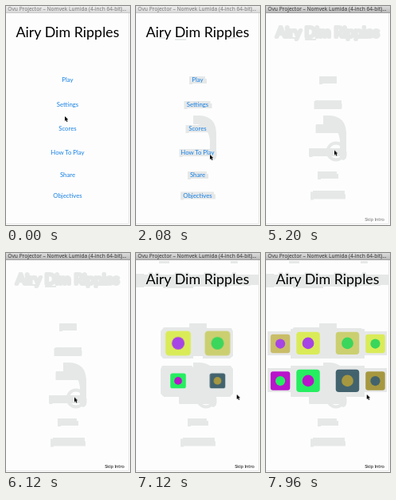
An HTML page that plays this animation: 156x274 px, repeating every 8 s.

```html
<!DOCTYPE html>
<html lang="en">
<head>
<meta charset="utf-8">
<title>Menu and intro</title>
<style>
  html, body { margin: 0; width: 100%; height: 100%; overflow: hidden; background: #fdfdfd; }
  svg { display: block; width: 156px; height: 274px; }
  text { font-family: Lato, sans-serif; text-anchor: middle; }
  .bar { font: 6.6px "Noto Sans", sans-serif; }
  .title { font-size: 17.9px; }
  .label { font-size: 7.8px; fill: #1680e4; }
  .skip { font-size: 5.9px; fill: #111; }
  .smear { fill: #e6e8e8; stroke: #e6e8e8; stroke-width: 0; stroke-linejoin: round; }
  .tile, .ring { transform-box: fill-box; transform-origin: center; }
</style>
</head>
<body>
<svg id="stage" viewBox="0 0 156 274">
  <defs>
    <linearGradient id="idle" x2="0" y2="1"><stop stop-color="#ececec"/><stop offset="1" stop-color="#d9d9d9"/></linearGradient>
    <linearGradient id="active" x2="0" y2="1"><stop stop-color="#dcdcdc"/><stop offset="1" stop-color="#b9b9b9"/></linearGradient>
  </defs>
</svg>
<script>
const LOOP = 8000;
const stage = document.getElementById('stage');

function add(tag, attrs = {}, parent = stage, text = '') {
  const el = document.createElementNS('http://www.w3.org/2000/svg', tag);
  for (const key in attrs) el.setAttribute(key, attrs[key]);
  el.textContent = text;
  return parent.appendChild(el);
}

// steps: [time in ms, value, easing towards the next step]
function track(el, prop, steps) {
  const first = [0, steps[0][1]], last = [LOOP, steps[steps.length - 1][1]];
  const frames = [first, ...steps, last].map(([time, value, easing = 'linear']) =>
    ({ offset: time / LOOP, [prop]: value, easing }));
  el.animate(frames, { duration: LOOP, iterations: Infinity });
  return el;
}

const fade = (el, ...steps) => track(el, 'opacity', steps);
const showAt = (el, time) => fade(el, [time, 0], [time, 1]);
const hideAt = (el, time) => fade(el, [time, 1], [time, 0]);

const TITLE = 'Airy Dim Ripples';
const WINDOW = 'Ovu Projector – Nomvek Lumida (4-inch 64-bit)...';
const LABELS = [
  ['Play', 95, 18], ['Settings', 126, 31], ['Scores', 156, 27],
  ['How To Play', 186, 43], ['Share', 214, 22], ['Objectives', 239.5, 40]
];

add('rect', { width: 156, height: 274, fill: '#fdfdfd' });

// Grey smears left on the paper
function smear(time, paths) {
  const group = showAt(add('g', { class: 'smear' }), time);
  for (const d of paths) add('path', { d }, group);
  return group;
}

const menuSmear = smear(1280, [
  'M72 137H80Q100 138 101 158V190Q97 196 93 190V168Q91 152 78 148H72Z',
  'M29 39h8v2h-8z M49 41h14v2h-14z M113 39h15v2h-15z'
]);
for (const [, y, width] of LABELS)
  add('path', { d: `M${76 - width / 2} ${y - 7}h${width + 2}v3h2v6h-${width}v1h-4z` }, menuSmear);

const fadeSmear = smear(4560, [
  'M70 88h19v9h-19z M62 118h33v11h-33z M63 148h29v11h-29z',
  'M54 178h42v10h-42z M67 207h22v9h-22z M59 231h40v10h-40z'
]);
add('circle', { cx: 88, cy: 182, r: 10.5, fill: 'none', 'stroke-width': 4 }, fadeSmear);
add('text', { class: 'title', x: 77.5, y: 39, 'stroke-width': 4 }, fadeSmear, TITLE);

smear(6240, ['M0 26H10V27H155V40H144V41H103V42H72V44H34V42H10V43H0Z', 'M29 10h13v3h-13z M119 10h9v3h-9z']);
smear(7120, [
  'M35 93H70V88H86V94H120L122 98V129L118 132H84V128H72V132H34L31 128V98Z',
  'M33 141H70L73 144H84L87 141H119L122 145V176L118 180H96V189H55V180H35L31 176V145Z'
]);
smear(7760, [
  'M2 98H31V95H124V98H152V128H124V132H31V128H2Z',
  'M2 144H31V141H124V144H152V174H124V180H31V174H2Z'
]);

// Menu and title
const title = add('text', { class: 'title', x: 77.5, y: 39 }, stage, TITLE);
fade(title, [4360, 1], [4920, 0], [6120, 0], [6560, 1]);

const menu = fade(add('g'), [4360, 1], [4920, 0]);
for (const [label, y] of LABELS) add('text', { class: 'label', x: 77.5, y }, menu, label);

const skip = add('text', { class: 'skip', x: 136.5, y: 269 }, stage, 'Skip Intro');
fade(skip, [5040, 0], [5320, 1]);

// Tiles: centre, size, colours, start time
function tile(x, y, size, fill, dot, start) {
  const group = add('g', { class: 'tile' });
  const half = size / 2;
  add('rect', { x: x - half, y: y - half, width: size, height: size * .96, rx: size * .13, fill }, group);
  add('circle', { cx: x, cy: y - size * .02, r: size * .25, fill: dot }, group);
  track(group, 'transform', [
    [start, 'scale(0)', 'ease-out'], [start + 200, 'scale(1.15)', 'ease-in-out'], [start + 320, 'scale(1)']
  ]);
}

const YELLOW = '#daeb58', KHAKI = '#cbcf70', LIME = '#25ee60', SLATE = '#42636e';
const VIOLET = '#a744e5', GREEN = '#3bd65c', MAGENTA = '#b914cb', OLIVE = '#a69840';

tile(53, 113.5, 29.5, YELLOW, VIOLET, 6960);
tile(102.5, 113.5, 29.5, KHAKI, GREEN, 6960);
tile(53, 160.5, 29.5, LIME, MAGENTA, 7040);
tile(102.5, 160.5, 29.5, SLATE, OLIVE, 7040);
tile(18, 114, 24.5, '#c9bd68', VIOLET, 7600);
tile(137.5, 114, 24.5, YELLOW, GREEN, 7600);
tile(18, 160.5, 24.5, MAGENTA, LIME, 7620);
tile(137.5, 160.5, 24.5, OLIVE, SLATE, 7620);

// Window frame, becoming active on the click
add('path', { d: 'M154.5 8V272.5H0', fill: 'none', stroke: '#e8e8e8' });
function titleBar(fill, ink, line) {
  const group = add('g');
  add('rect', { width: 156, height: 8.5, fill: `url(#${fill})` }, group);
  add('rect', { y: 8, width: 156, height: .7, fill: line }, group);
  add('text', { class: 'bar', x: 77, y: 6.3, fill: ink }, group, WINDOW);
  return group;
}
hideAt(titleBar('idle', '#777', '#bbb'), 4040);
showAt(titleBar('active', '#333', '#888'), 4040);

// Touch ring and pointer
const ring = add('circle', {
  class: 'ring', cx: 86, cy: 181, r: 10.3, fill: 'none', stroke: '#111',
  'stroke-width': 1.5, 'vector-effect': 'non-scaling-stroke'
});
track(ring, 'transform', [[4040, 'scale(.4)', 'ease-out'], [4160, 'scale(1)'], [4400, 'scale(1.15)']]);
fade(ring, [4040, 0], [4040, 1], [4240, 1], [4440, 0]);

const pointer = add('path', {
  d: 'M0 0V5.9L1.4 4.7L2.4 7L3.5 6.5L2.5 4.3H4.3Z',
  fill: '#000', stroke: '#fff', 'stroke-width': .8, 'paint-order': 'stroke'
});
track(pointer, 'transform', [
  [800, 74, 138], [960, 86, 141], [1120, 94, 151], [1320, 95, 166], [1560, 94, 180], [1720, 93, 186],
  [2720, 93, 186], [3200, 86, 180.5], [6200, 86, 180.5], [6680, 105, 180], [7120, 126.7, 177]
].map(([time, x, y]) => [time, `translate(${x}px, ${y}px)`]));
</script>
</body>
</html>
```
